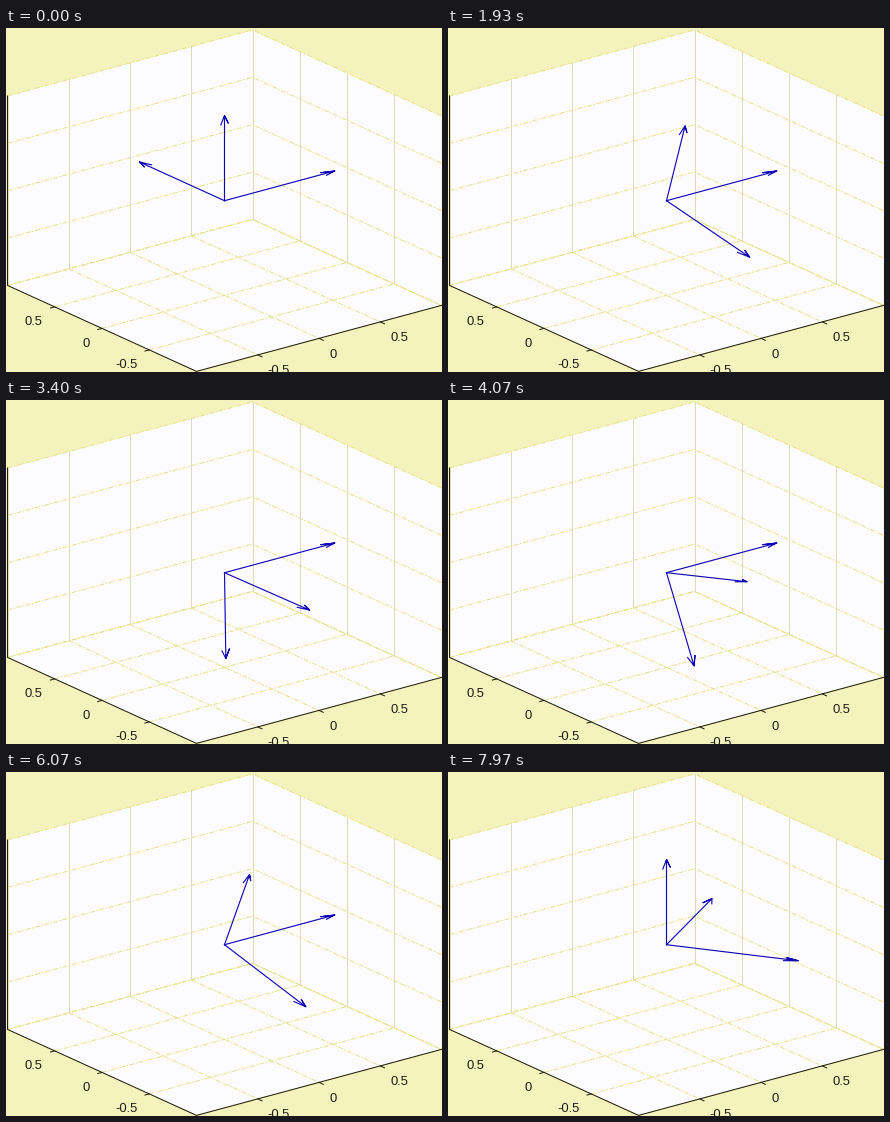
Animation of 436 by 344 pixels, one loop 8 s. Source, as a matplotlib script:

```python
import numpy as np
import matplotlib.pyplot as plt
from matplotlib.animation import FuncAnimation

W, H, DPI = 436, 344, 100
PX = 72 / DPI
FRAMES, LOOP_MS = 240, 8000
PHASE = 101  # frames per rotation

BACK, WALL, INK, BLUE = "#f5f3bd", "#fcfcff", "#1c1c14", "#1206b6"
GRID, UPRIGHT = "#e6e382", "#dcdcba"

CENTRE = np.array([218.0, 172.2])
# screen offset of one unit along x, y and z
AXES = np.array([[122.5, -33.0], [-94.5, -43.0], [0.0, -94.7]])

plt.rcParams["font.family"] = "Liberation Sans"
fig = plt.figure(figsize=(W / DPI, H / DPI), dpi=DPI, facecolor=BACK)
ax = fig.add_axes([0, 0, 1, 1])
ax.set_xlim(-0.5, W - 0.5)
ax.set_ylim(H - 0.5, -0.5)
ax.axis("off")


def project(points):
    return CENTRE + np.asarray(points, float) @ AXES


def line(points, color, width=1.0, **style):
    xy = project(points)
    return ax.plot(xy[:, 0], xy[:, 1], color=color, lw=width * PX, **style)[0]


def wall(points):
    ax.fill(*project(points).T, color=WALL, lw=0)


def draw_box():
    wall([(-1, 1, -1), (1, 1, -1), (1, 1, 1), (-1, 1, 1)])
    wall([(1, -1, -1), (1, 1, -1), (1, 1, 1), (1, -1, 1)])
    wall([(-1, -1, -1), (1, -1, -1), (1, 1, -1), (-1, 1, -1)])

    dashes = dict(dashes=(5, 1.5, 1.5, 1.5), dash_capstyle="butt")
    for t in (-1, -0.5, 0, 0.5, 1):
        line([(t, 1, -1), (t, -1, -1)], GRID, **dashes)
        line([(-1, t, -1), (1, t, -1)], GRID, **dashes)
        line([(-1, 1, t), (1, 1, t), (1, -1, t)], GRID, **dashes)
        line([(t, 1, -1), (t, 1, 1)], UPRIGHT)
        line([(1, t, -1), (1, t, 1)], UPRIGHT)

    line([(-1, 1, 1), (-1, 1, -1), (-1, -1, -1), (1, -1, -1)], INK)


def draw_ticks():
    text = dict(color=INK, fontsize=13 * PX, va="baseline")
    for t in (-0.5, 0, 0.5):
        label = f"{t:g}"
        line([(-1, t, -1), (-1.035, t, -1)], INK)
        line([(t, -1, -1), (t, -1.045, -1)], INK)
        x, y = project((-1, t, -1))
        ax.text(x - 12, y + 18.5, label, ha="right", **text)
        x, y = project((t, -1, -1))
        ax.text(x + 10, y + 19.5, label, ha="left", **text)


def pose(frame):
    """Roll about x and yaw about z, in degrees."""
    phase, k = divmod(frame, PHASE)
    if phase == 0:
        return 1.8 * k, 0.0
    if phase == 1:
        return 180 - 0.9 * k, 0.0
    return 90.0, 0.9 * k


def rotation(roll, yaw):
    r, q = np.radians([roll, yaw])
    about_x = np.array([[1, 0, 0],
                        [0, np.cos(r), -np.sin(r)],
                        [0, np.sin(r), np.cos(r)]])
    about_z = np.array([[np.cos(q), -np.sin(q), 0],
                        [np.sin(q), np.cos(q), 0],
                        [0, 0, 1]])
    return about_z @ about_x


def arrow_points(v):
    """Shaft plus an open head whose barbs spread horizontally."""
    tip = 0.9 * v
    side = np.array([-v[1], v[0], 0])
    size = np.hypot(*side[:2])
    side = side / size if size > 1e-6 else np.array([1.0, 0, 0])
    barb = 0.03 * side
    neck = 0.9 * tip
    return project([np.zeros(3), tip, neck + barb, tip, neck - barb])


draw_box()
draw_ticks()
arrows = [line(np.zeros((2, 3)), BLUE, 1.15, solid_joinstyle="round",
               zorder=5) for _ in range(3)]


def update(frame):
    turn = rotation(*pose(frame))
    for arrow, v in zip(arrows, turn.T):
        arrow.set_data(*arrow_points(v).T)
    return arrows


anim = FuncAnimation(fig, update, frames=FRAMES, interval=LOOP_MS / FRAMES,
                     init_func=lambda: update(0), blit=False,
                     repeat=True, repeat_delay=0)
plt.show()
```
